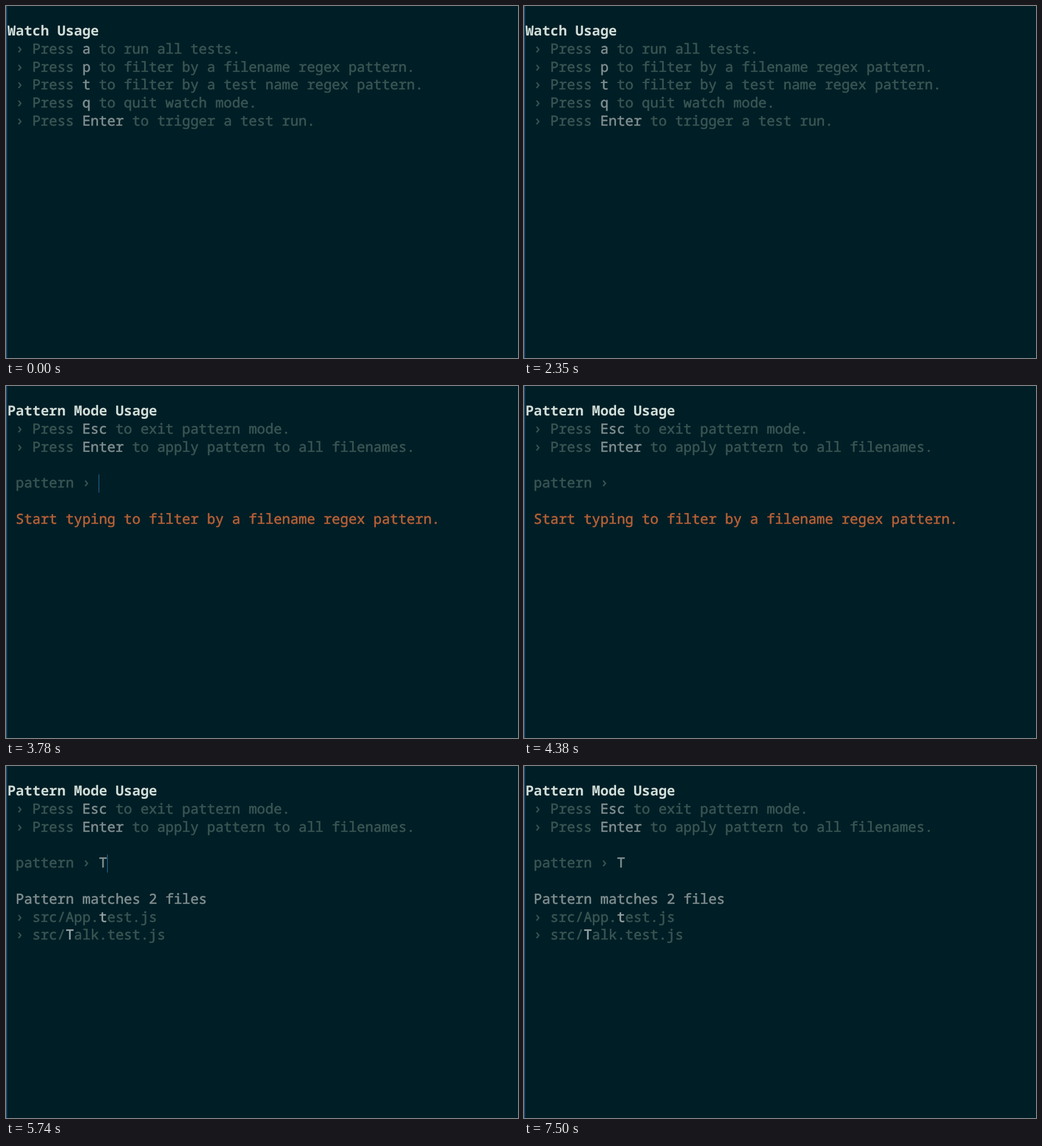
These frames come from a looping animation (901x621 px, 8 s). An HTML page with a canvas:

```html
<!DOCTYPE html>
<html lang="en">
<head>
<meta charset="utf-8">
<title>Watch mode terminal</title>
<style>
  html, body { margin: 0; width: 100%; height: 100%; overflow: hidden; background: #001e26; }
  canvas { display: block; }
</style>
</head>
<body>
<canvas id="stage" width="901" height="621"></canvas>
<script>
const ctx = document.getElementById('stage').getContext('2d');
const LOOP = 8000;
const LEFT = 2.4, CELL = 14.64, BASELINE = 52, ROW = 31.8;
const FONT = '24.4px "Noto Sans Mono", monospace';

// A marker character switches the style of the text after it.
// The outline thickens the regular face to a medium weight.
const STYLES = {
  '*': { color: '#d0dcd6', weight: 700, outline: 0 },
  '~': { color: '#385452', weight: 400, outline: 0.7 },
  '^': { color: '#7d8c8d', weight: 400, outline: 0.7 },
  '!': { color: '#95a3a3', weight: 400, outline: 0.7 },
  '#': { color: '#b25f36', weight: 400, outline: 0.7 }
};

const patternHead = [
  '*Pattern Mode Usage',
  '~ › Press ^Esc~ to exit pattern mode.',
  '~ › Press ^Enter~ to apply pattern to all filenames.',
  ''
];

// Each scene's cursor starts in the given state and toggles at the blink times.
const scenes = [
  {
    start: 0, visible: false, blinks: [550, 1150, 1750, 2350], cursor: [3, 219],
    lines: [
      '*Watch Usage',
      '~ › Press ^a~ to run all tests.',
      '~ › Press ^p~ to filter by a filename regex pattern.',
      '~ › Press ^t~ to filter by a test name regex pattern.',
      '~ › Press ^q~ to quit watch mode.',
      '~ › Press ^Enter~ to trigger a test run.'
    ]
  },
  {
    start: 2630, visible: true, blinks: [3180, 3780, 4380, 4980, 5580], cursor: [163, 156],
    lines: [
      ...patternHead,
      '~ pattern ›',
      '',
      '# Start typing to filter by a filename regex pattern.'
    ]
  },
  {
    start: 5740, visible: true, blinks: [6300, 6900, 7500], cursor: [178, 156],
    lines: [
      ...patternHead,
      '~ pattern › ^T',
      '',
      '^ Pattern matches 2 files',
      '~ › src/App.!t~est.js',
      '~ › src/!T~alk.test.js'
    ]
  }
];

function drawLine(line, row) {
  const y = Math.round(BASELINE + row * ROW);
  let column = 0, outline = 0;
  for (const char of line) {
    const style = STYLES[char];
    if (style) {
      ctx.fillStyle = ctx.strokeStyle = style.color;
      ctx.font = `${style.weight} ${FONT}`;
      outline = style.outline;
      continue;
    }
    const x = LEFT + column++ * CELL;
    ctx.fillText(char, x, y);
    if (outline) {
      ctx.lineWidth = outline;
      ctx.strokeText(char, x, y);
    }
  }
}

function draw(time) {
  const scene = scenes.findLast(s => time >= s.start);
  const toggles = scene.blinks.filter(t => time >= t).length;

  ctx.fillStyle = '#001e26';
  ctx.fillRect(0, 0, 901, 621);
  ctx.fillStyle = '#214a6b';
  ctx.fillRect(0, 0, 2, 621);
  scene.lines.forEach(drawLine);

  if (scene.visible !== (toggles % 2 === 1)) {
    ctx.fillStyle = '#2574a8';
    ctx.fillRect(...scene.cursor, 1, 32);
  }
}

const origin = performance.now();
function tick() {
  draw((performance.now() - origin) % LOOP);
  requestAnimationFrame(tick);
}
ctx.textRendering = 'geometricPrecision';
ctx.lineJoin = 'round';
tick();
</script>
</body>
</html>
```
